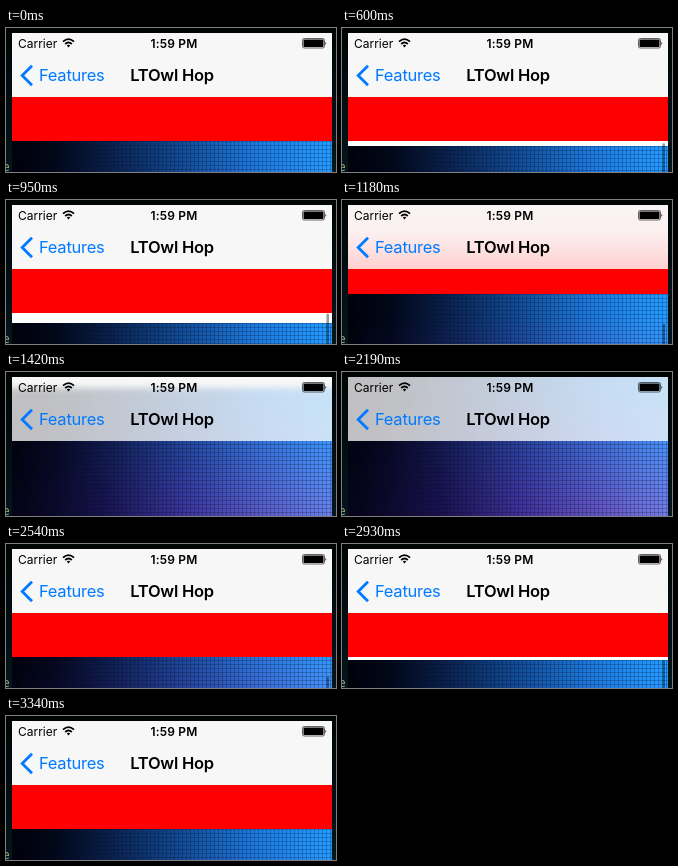
An HTML page that plays this animation: 330x144 px, repeating every 4.25 s.

```html
<!DOCTYPE html>
<html lang="en">
<head>
<meta charset="utf-8">
<title>Scrolling header</title>
<style>
  html, body { margin: 0; width: 100%; height: 100%; overflow: hidden; background: #02090d; }
  svg { display: block; width: 100vw; height: 100vh; }
  text { font-family: Inter, Roboto, "Liberation Sans", sans-serif; }
  .nav { font-size: 16.5px; letter-spacing: -.25px; }
  .status { font-size: 12px; }
  .bold { font-weight: 600; }
</style>
</head>
<body>
<svg viewBox="0 0 330 144" xmlns="http://www.w3.org/2000/svg">
  <defs>
    <linearGradient id="desk" x2="0" y2="1">
      <stop stop-color="#000405"/>
      <stop offset="1" stop-color="#03161c"/>
    </linearGradient>
    <linearGradient id="blue" gradientUnits="userSpaceOnUse" x1="6" x2="326">
      <stop stop-color="#000005"/>
      <stop offset=".14" stop-color="#020818"/>
      <stop offset=".32" stop-color="#0a2450"/>
      <stop offset=".52" stop-color="#124a92"/>
      <stop offset=".77" stop-color="#1d7ce0"/>
      <stop offset="1" stop-color="#249cff"/>
    </linearGradient>
    <linearGradient id="violet" gradientUnits="userSpaceOnUse" x1="6" x2="326" y1="40" y2="0">
      <stop stop-color="#06041a"/>
      <stop offset=".25" stop-color="#1c1250"/>
      <stop offset=".5" stop-color="#43329a"/>
      <stop offset=".75" stop-color="#6658c4"/>
      <stop offset="1" stop-color="#7688f0"/>
    </linearGradient>
    <linearGradient id="fade" gradientUnits="userSpaceOnUse" x2="0" y1="20" y2="150">
      <stop stop-color="#000"/>
      <stop offset="1" stop-color="#fff"/>
    </linearGradient>
    <mask id="lower" maskUnits="userSpaceOnUse" x="-20" y="0" width="372" height="360">
      <rect x="-20" width="372" height="360" fill="url(#fade)"/>
    </mask>
    <linearGradient id="pink" x2="0" y2="1">
      <stop stop-color="#f9f5f5"/>
      <stop offset=".45" stop-color="#fceeee"/>
      <stop offset="1" stop-color="#ffcfcf"/>
    </linearGradient>
    <pattern id="grid" width="4" height="4" patternUnits="userSpaceOnUse">
      <path d="M0 .5H4M.5 0V4" stroke="#000828" stroke-opacity=".24"/>
    </pattern>
    <filter id="blur" x="-10%" y="-10%" width="120%" height="120%">
      <feGaussianBlur stdDeviation="3"/>
    </filter>
    <clipPath id="screen"><rect x="6" y="5" width="320" height="139"/></clipPath>
    <clipPath id="bar"><rect x="6" y="5" width="320" height="64"/></clipPath>
    <g id="art">
      <rect x="-20" width="372" height="360" fill="url(#blue)"/>
      <rect x="-20" width="372" height="360" fill="url(#violet)" mask="url(#lower)"/>
    </g>
  </defs>

  <rect width="330" height="144" fill="url(#desk)"/>
  <text x="-4" y="143" fill="#a0a286" style="font:13px 'DejaVu Sans Mono',monospace">e</text>

  <g clip-path="url(#screen)">
    <rect x="6" y="5" width="320" height="139" fill="#fff"/>
    <g id="content">
      <use href="#art"/>
      <rect x="6" width="320" height="360" fill="url(#grid)"/>
      <text x="166" y="219" text-anchor="middle" fill="#1668d8" font-size="18" letter-spacing="-.1">Push View Controller</text>
    </g>
    <rect id="red" x="6" width="320" height="44" fill="#f00"/>
    <rect id="thumb" x="320.5" width="2.5" height="90" rx="1.25" fill="#000" fill-opacity=".4"/>
  </g>

  <g clip-path="url(#bar)">
    <rect x="6" y="5" width="320" height="64" fill="#f7f7f7"/>
    <g id="glass" opacity=".22"><use href="#art" filter="url(#blur)"/></g>
    <rect id="tint" x="6" y="5" width="320" height="64" fill="url(#pink)"/>
  </g>

  <text class="status" x="12" y="20">Carrier</text>
  <g fill="none" stroke="#000" stroke-width="1.8">
    <path d="M57 13.6Q62.5 8.6 68 13.6M59.2 16Q62.5 13 65.8 16"/>
    <path d="M60.8 17.6Q62.5 16 64.2 17.6L62.5 19.4Z" fill="#000" stroke="none"/>
  </g>
  <text class="status bold" x="168" y="20" text-anchor="middle" letter-spacing=".15">1:59 PM</text>
  <rect x="296.5" y="10.5" width="22" height="9.5" rx="1.8" fill="none" stroke="#000" stroke-width=".6"/>
  <rect x="297.5" y="11.5" width="20" height="7.5" rx="1"/>
  <path d="M319.5 13.7q1.8 1.6 0 3.2z"/>

  <path d="M26 37.8L16.2 47.5L26 57.2" fill="none" stroke="#007aff" stroke-width="2.8"/>
  <text class="nav" x="33" y="53" fill="#007aff">Features</text>
  <text class="nav bold" x="166" y="53" text-anchor="middle">LTOwl Hop</text>
</svg>
<script>
  const LOOP = 4250, HEADER = 44, TOP = 113;
  // Bursts of evenly spaced redraws: start, end, count.
  const bursts = [[600, 1120, 9], [1180, 1660, 9], [1710, 2190, 9], [2250, 2760, 10], [2810, 3280, 7]];
  // Scroll offset over time.
  const keys = [[600, -5], [800, -13], [1000, -6], [1120, 4], [1180, 19], [1420, 105], [1660, 172],
    [1770, 180], [1950, 170], [2190, 125], [2533, 45], [2760, 9], [2950, -5], [3280, 0]];

  const el = id => document.getElementById(id);
  const [content, red, thumb, glass, tint] = ['content', 'red', 'thumb', 'glass', 'tint'].map(el);
  const clamp = (v, lo, hi) => Math.min(hi, Math.max(lo, v));

  function snap(t) {
    const burst = bursts.filter(b => b[0] <= t).pop();
    if (!burst) return t;
    const [start, end, count] = burst;
    const step = (end - start) / (count - 1);
    return start + step * Math.min(count - 1, Math.floor((t - start) / step + 1e-6));
  }

  function slope(i) {
    if (i === 0 || i === keys.length - 1) return 0;
    const a = keys[i - 1], b = keys[i + 1];
    return (b[1] - a[1]) / (b[0] - a[0]);
  }

  function scrollAt(t) {
    if (t < 600 || t >= 3280) return 0;
    const i = keys.findIndex(k => k[0] > t) - 1;
    const [t0, v0] = keys[i], [t1, v1] = keys[i + 1];
    const d = t1 - t0, u = (t - t0) / d, w = 1 - u;
    return w * w * (1 + 2 * u) * v0 + u * u * (3 - 2 * u) * v1
      + d * u * w * (w * slope(i) - u * slope(i + 1));
  }

  function draw(time) {
    const t = snap(time);
    const s = Math.round(scrollAt(t));
    // On the way back the header returns before the content does.
    const hidden = clamp(t < 2000 ? s : s - 61, 0, HEADER);
    content.setAttribute('transform', `translate(0 ${TOP - s})`);
    glass.setAttribute('transform', `translate(0 ${TOP + 8 - s})`);
    red.setAttribute('y', 69 - hidden);
    tint.setAttribute('opacity', Math.sin(Math.PI * hidden / HEADER));
    thumb.setAttribute('y', 117 + s * .35);
    thumb.setAttribute('visibility', time >= 600 && time < 3340 ? 'visible' : 'hidden');
  }

  const origin = performance.now();
  function tick() {
    draw((performance.now() - origin) % LOOP);
    requestAnimationFrame(tick);
  }
  tick();
</script>
</body>
</html>
```
